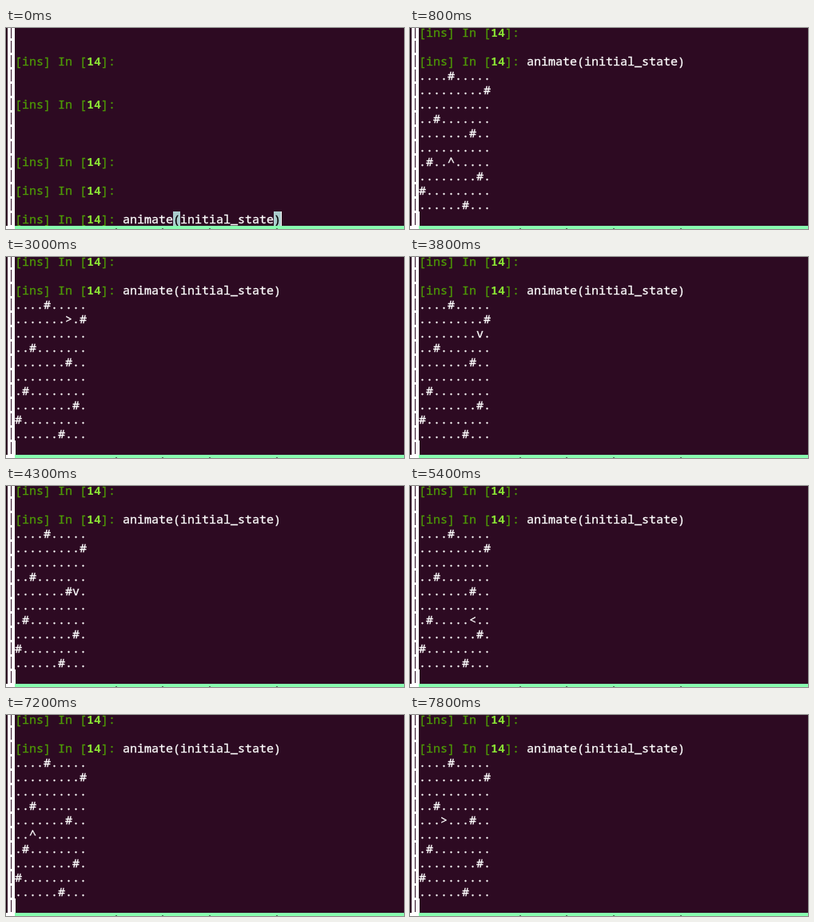
Write an HTML page that moves like this. It is 498 px wide and 252 px high and loops after 8000 ms.

```html
<!DOCTYPE html>
<html lang="en">
<head>
<meta charset="utf-8">
<title>Guard walk in a terminal</title>
<style>
  html, body { margin: 0; width: 100%; height: 100%; overflow: hidden; background: #2d0a22; }
  #stage { position: relative; width: 498px; height: 252px; overflow: hidden; }
  #stage > * { position: absolute; margin: 0; }
  #screen {
    left: 11px; top: -4px; color: #fff;
    font: 15px/18px "Noto Sans Mono", "DejaVu Sans Mono", monospace;
    font-variant-ligatures: none;
    -webkit-text-stroke: .3px;
  }
  #screen i { font-style: normal; color: #4e9a06; }
  #screen b { color: #8ae234; -webkit-text-stroke: 0; }
  #screen u, #screen s {
    display: inline-block; height: 18px; vertical-align: top; text-decoration: none;
  }
  #screen u { background: #aacccc; color: #000; }
  #screen s { width: 1px; margin-right: -1px; background: #fff; }
  #split { left: 2px; top: 0; width: 9px; height: 252px; background: #fff; }
  #bars {
    left: 6px; top: -2px; width: 1px; height: 250px;
    background: repeating-linear-gradient(#2d0a22 0 15px, #fff 15px 18px);
  }
  #corner { left: 0; top: 248px; width: 11px; height: 4px; background: #fff; }
  #status { left: 11px; top: 248px; width: 487px; height: 4px; background: #87ffaf; }
  #status span { position: absolute; top: 3px; width: 2px; height: 1px; background: #2d0a22; opacity: .6; }
</style>
</head>
<body>
<div id="stage">
  <div id="split"></div>
  <div id="bars"></div>
  <div id="corner"></div>
  <pre id="screen"></pre>
  <div id="status"></div>
</div>
<script>
const LOOP = 8000, RUN = 800;
const screen = document.getElementById('screen');
const room = [
  '....#.....', '.........#', '..........', '..#.......', '.......#..',
  '..........', '.#........', '........#.', '#.........', '......#...'
];
const dirs = [['^', 0, -1], ['>', 1, 0], ['v', 0, 1], ['<', -1, 0]];
// Each tick is either one step ahead or one right turn.
const ticks = [
  1100, 1300, 1600, 1900, 2000, 2400, 2600, 2900, 3000, 3300, 3500, 3800, 4100, 4300,
  4600, 4800, 5100, 5400, 5600, 5900, 6000, 6300, 6500, 6800, 7200, 7300, 7600, 7800
];

const prompt = '<i>[ins] In [<b>14</b>]:</i>';
const cursor = '<s></s>';
const typed = Array(14).fill('');
for (const row of [2, 5, 9, 11, 13]) typed[row] = prompt;
typed[13] += ' animate<u>(</u>initial_state<u>)</u>' + cursor;

function drawRoom(x, y, mark) {
  const rows = room.map((row, i) =>
    i === y ? row.slice(0, x) + mark + row.slice(x + 1) : row);
  return [prompt, '', prompt + ' animate(initial_state)',
    ...rows.map(row => row.replace('<', '&lt;').replace('>', '&gt;')), cursor].join('\n');
}

const scenes = [typed.join('\n')];
let x = 4, y = 6, dir = 0;
scenes.push(drawRoom(x, y, dirs[dir][0]));
for (const _ of ticks) {
  const [, dx, dy] = dirs[dir];
  if (room[y + dy][x + dx] === '#') dir = (dir + 1) % 4;
  else { x += dx; y += dy; }
  scenes.push(drawRoom(x, y, dirs[dir][0]));
}

// Tops of the letters in the cut-off status line
document.getElementById('status').innerHTML = [126, 184, 243, 327]
  .map(left => `<span style="left:${left}px"></span>`).join('');

const starts = [RUN, ...ticks];
let shown = -1;
function frame(now) {
  const t = now % LOOP;
  const index = starts.filter(start => start <= t).length;
  if (index !== shown) screen.innerHTML = scenes[shown = index];
  requestAnimationFrame(frame);
}
frame(performance.now());
</script>
</body>
</html>
```
